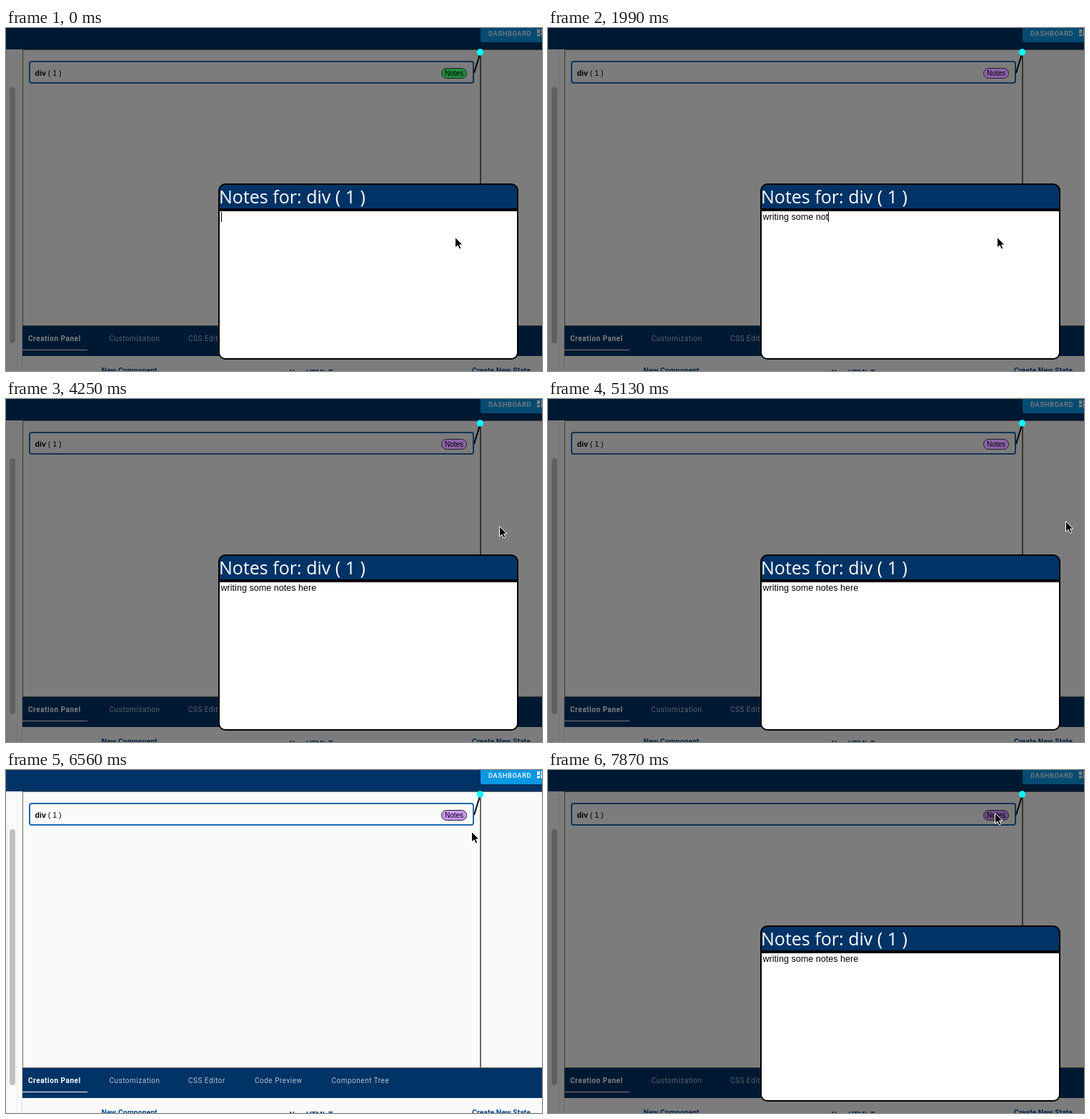
Animation, 750 px wide and 481 px high, one loop 8 s. Source, as an HTML page:

```html
<!DOCTYPE html>
<html lang="en">
<head>
<meta charset="utf-8">
<title>Component notes</title>
<style>
  html, body { margin: 0; width: 100%; height: 100%; overflow: hidden; background: #fafafa; }
  svg { position: absolute; left: 0; top: 0; display: block; }
  .ui { font-family: Roboto, sans-serif; }
  .arial { font-family: "Liberation Sans", Arial, sans-serif; }
  .tab { font-size: 10px; letter-spacing: .5px; fill: #b3c2d1; }
  .tab.on { font-weight: 700; letter-spacing: .55px; fill: #fff; }
  .head { font-size: 10.5px; font-weight: 700; fill: #0d4a8c; }
  #note {
    position: absolute; left: 300.5px; top: 257px; height: 16px;
    font: 12.6px/16px "Liberation Sans", Arial, sans-serif; white-space: pre; color: #000;
  }
  #caret { display: inline-block; width: 1px; height: 14px; margin-right: -1px; background: #000; vertical-align: top; margin-top: 1px; }
</style>
</head>
<body>
<svg width="750" height="481" viewBox="0 0 750 481">
  <rect width="750" height="481" fill="#fafafa"/>

  <!-- side scrollbar -->
  <path d="M2.5 30V481M15.5 30V481" stroke="#ececec"/>
  <rect x="5" y="83" width="8" height="359" rx="4" fill="#c1c1c1"/>

  <!-- top bar -->
  <rect width="750" height="30" fill="#003366"/>
  <rect x="664" y="-10" width="100" height="30" rx="3" fill="#0a97e4"/>
  <text class="ui" x="675" y="11" font-size="9.2" font-weight="500" letter-spacing=".7" fill="#fff">DASHBOARD</text>
  <path d="M743 2h4v5h-4zM743 8.500h4v3h-4zM748.500 2h4v3h-4zM748.500 6h4v5.500h-4z" fill="#fff"/>

  <!-- canvas -->
  <path d="M23.500 418V30.500H750M23 417.500H750" fill="none" stroke="#6f6f62"/>
  <path d="M664 34V417" stroke="#6a6a5e" stroke-width="2"/>
  <rect x="33" y="47" width="621" height="30" rx="3" fill="#fafafa" stroke="#1b6aad" stroke-width="2"/>
  <text class="arial" x="40.500" y="67" font-size="10.600"><tspan font-weight="700">div</tspan> ( 1 )</text>
  <path d="M655 63L663 37" stroke="#000" stroke-width="2"/>

  <!-- bottom panel -->
  <rect x="23" y="418" width="727" height="42" fill="#003366"/>
  <path d="M22.500 418V481" stroke="#d5d5d5"/>
  <path d="M23 451.500H114" stroke="#fff"/>
  <g class="ui">
    <text class="tab on" x="31" y="439">Creation Panel</text>
    <text class="tab" x="144.500" y="439">Customization</text>
    <text class="tab" x="255" y="439">CSS Editor</text>
    <text class="tab" x="348" y="439">Code Preview</text>
    <text class="tab" x="455.500" y="439">Component Tree</text>
    <text class="head" x="133.500" y="484">New Component</text>
    <text class="head" x="396.500" y="487">New HTML Tag:</text>
    <text class="head" x="652" y="484">Create New State</text>
  </g>

  <rect class="modal" width="750" height="481" opacity=".5"/>
  <circle cx="663.500" cy="34" r="4.700" fill="#0ff"/>
  <rect id="chip" x="609.500" y="56.500" width="35" height="14" rx="7" stroke="#222"/>
  <text class="arial" x="614" y="67" font-size="10">Notes</text>

  <g class="modal">
    <rect x="298" y="219" width="418" height="245" rx="9" fill="#fff"/>
    <path d="M298 254V228a9 9 0 0 1 9-9H707a9 9 0 0 1 9 9V254z" fill="#003366"/>
    <rect x="298" y="253" width="418" height="4"/>
    <rect x="298" y="219" width="418" height="245" rx="9" fill="none" stroke="#000" stroke-width="2"/>
    <text x="298" y="246" font-family="'Open Sans', 'Noto Sans', sans-serif" font-size="25" fill="#fff">Notes for: div ( 1 )</text>
  </g>
</svg>

<div id="note" class="modal"><span id="typed"></span><span id="caret"></span></div>

<svg width="750" height="481" viewBox="0 0 750 481">
  <path id="arrow" d="M.5 .5V15L4 11.900L6.300 17L8.800 15.900L6.600 11H11z" fill="#000" stroke="#fff" stroke-width="1" stroke-linejoin="round"/>
</svg>

<script>
  const LOOP = 8000, CLOSE = 5550, REOPEN = 7870;
  const NOTE = "writing some notes here";
  const $ = id => document.getElementById(id);
  const modal = document.querySelectorAll(".modal");

  // bursts of typing: first key, last key, updates, length after the burst
  const bursts = [
    [300, 470, 3, 5], [640, 700, 2, 7], [990, 1170, 3, 10], [1340, 1460, 2, 12],
    [1640, 1810, 3, 15], [1990, 2170, 3, 18], [2350, 2760, 5, 23]
  ];
  // pointer moves: first step, last step, updates, x, y
  const moves = [
    [3780, 4070, 6, 690, 178], [4310, 4430, 3, 706, 178], [4670, 4900, 4, 738, 175],
    [5010, 5130, 3, 724, 171], [6330, 6620, 6, 626, 56], [6800, 6970, 4, 625, 60]
  ];
  const caretOn = [[0, 3240], [3780, 4250], [4730, 5130]];

  // share of a stepped change that is done at time t
  function done(t, from, to, n) {
    if (t < from) return 0;
    const k = Math.floor((t - from) / (to - from) * (n - 1) + 1e-6) + 1;
    return Math.min(k, n) / n;
  }
  const ease = p => p * p * (3 - 2 * p);

  function typedLength(t) {
    let len = 0;
    for (const [from, to, n, end] of bursts) len += Math.floor((end - len) * done(t, from, to, n) + 1e-6);
    return len;
  }

  function pointer(t) {
    let x = 628, y = 293;
    for (const [from, to, n, ex, ey] of moves) {
      const p = ease(done(t, from, to, n));
      x += (ex - x) * p;
      y += (ey - y) * p;
    }
    return [Math.round(x), Math.round(y)];
  }

  function chipColor(t) {
    if (t < 300) return "#1f8c3c";
    if (t < CLOSE) return "#8d63ab";
    return t < REOPEN ? "#cc99f7" : "#6b4a82";
  }

  function draw(t) {
    const open = t < CLOSE || t >= REOPEN;
    modal.forEach(el => el.style.visibility = open ? "visible" : "hidden");
    $("typed").textContent = NOTE.slice(0, typedLength(t));
    $("caret").style.opacity = +caretOn.some(([a, b]) => t >= a && t < b);
    $("chip").setAttribute("fill", chipColor(t));
    $("arrow").setAttribute("transform", `translate(${pointer(t)})`);
  }

  const start = performance.now();
  function tick() {
    draw((performance.now() - start) % LOOP);
    requestAnimationFrame(tick);
  }
  tick();
</script>
</body>
</html>
```
